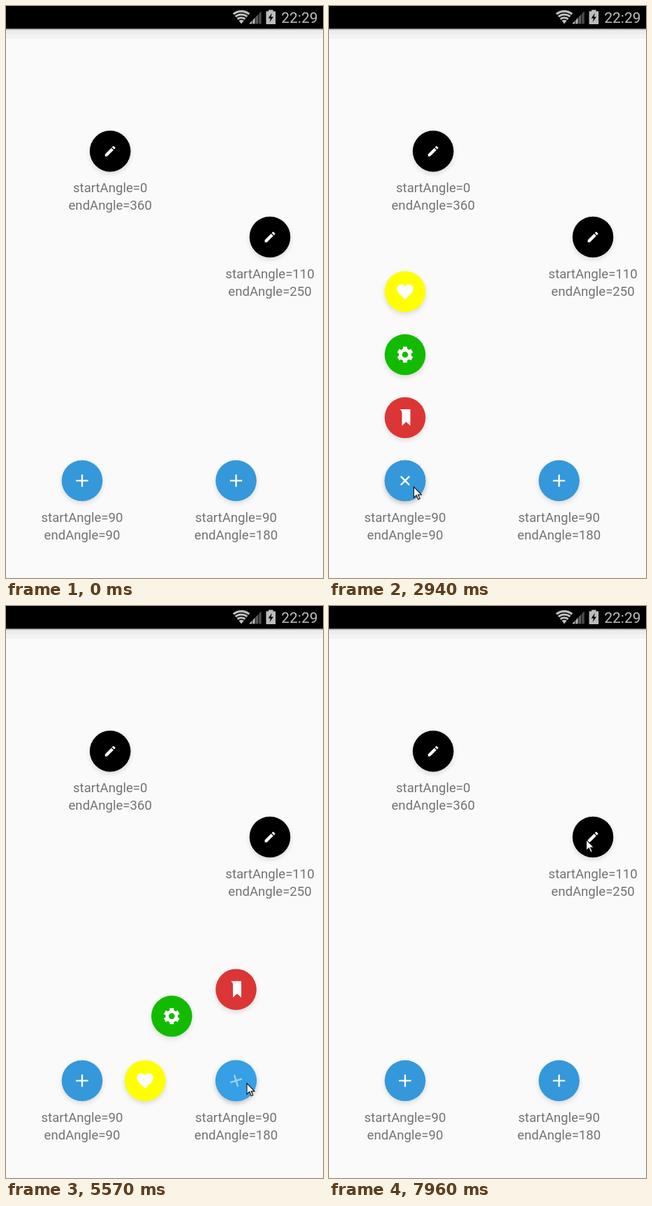
Write an HTML page with a canvas that moves like this. It is 454x817 px and loops after 8000 ms.

```html
<!DOCTYPE html>
<html lang="en">
<head>
<meta charset="utf-8">
<title>Expandable buttons</title>
<style>
html, body { margin: 0; height: 100%; overflow: hidden; background: #fafafa; }
canvas { display: block; }
</style>
</head>
<body>
<canvas id="stage" width="454" height="817"></canvas>
<script>
const g = document.getElementById('stage').getContext('2d');
const LOOP = 8000, R = 29.3, EXPAND = 225, SPIN = 235;
const BLUE = '#3498db', RED = '#dc3535', GREEN = '#12bb00', YELLOW = '#ffff00',
      ORANGE = '#ff8000', PINK = '#f08080', BLACK = '#000';

const pencilPath = new Path2D('M3 17.25V21h3.75L17.81 9.94l-3.75-3.75L3 17.25zM20.71 7.04a1 1 0 0 0 0-1.41l-2.34-2.34a1 1 0 0 0-1.41 0l-1.83 1.83 3.75 3.75z');
const heartPath = new Path2D('M12 21.35l-1.45-1.32C5.4 15.36 2 12.28 2 8.5 2 5.42 4.42 3 7.5 3c1.74 0 3.41.81 4.5 2.09C13.09 3.81 14.76 3 16.5 3 19.58 3 22 5.42 22 8.5c0 3.78-3.4 6.86-8.55 11.54z');
const markPath = new Path2D('M-7.5-12H7.5V11.5L1.5 6-4.5 11.5V-7Q-4.8-10.5-7.5-12z');
const copyPath = new Path2D('M-1.5 6H-8.5V-5L-3.5-10.5H3.5V-6M-8.5-5H-3.5V-10.5M-1.5 0L3.5-6H8.5V10.5H-1.5zM-1.5 0H3.5V-6');
const arrowPath = new Path2D('M.5.8V16.2L4.2 12.8 6.8 18.8 9.2 17.7 6.6 12H11.4z');
const boltPath = new Path2D('M381 10L375.5 17.5H379L377.5 23 383 15.5H379.5z');

function line(width, ...p) {
  g.lineWidth = width;
  g.beginPath();
  for (let i = 0; i < p.length; i += 2) g.lineTo(p[i], p[i + 1]);
  g.stroke();
}
function arc(width, x, y, r, from, to) {
  g.lineWidth = width;
  g.beginPath();
  g.arc(x, y, r, from, to);
  g.stroke();
}
function fitted(path, scale) {
  g.scale(scale, scale);
  g.translate(-12, -12);
  g.fill(path);
}

// Icons are drawn in white around the origin.
const icons = {
  plus() { line(2.3, -8.7, 0, 8.7, 0); line(2.3, 0, -8.7, 0, 8.7); },
  pencil() { fitted(pencilPath, .82); },
  heart() { fitted(heartPath, 1.18); },
  mark() { g.fill(markPath); },
  gear() {
    arc(4.6, 0, 0, 6.6, 0, 7);
    for (let i = 0; i < 6; i++) {
      line(6, 0, -7, 0, -11.4);
      g.rotate(Math.PI / 3);
    }
  },
  search() { arc(3, -3, -3.5, 6, 0, 7); g.lineCap = 'round'; line(4.2, 2.5, 2.5, 8.3, 9); },
  copy() { g.lineWidth = 1.7; g.stroke(copyPath); },
  refresh() {
    for (let i = 0; i < 2; i++) {
      arc(3, 0, 0, 9, Math.PI + .25, Math.PI * 1.85);
      g.beginPath();
      g.moveTo(11.5, -10); g.lineTo(11.5, -2); g.lineTo(3.5, -2);
      g.fill();
      g.rotate(Math.PI);
    }
  }
};

const trio = [['mark', RED], ['gear', GREEN], ['heart', YELLOW]];
const six = [['refresh', ORANGE], ['mark', BLUE], ['gear', PINK], ['heart', YELLOW], ['search', RED], ['copy', GREEN]];

// press/open and press2/close are times in ms; dist is the settled distance of item i.
const menus = [
  { x: 149.2, y: 207.4, from: 0, to: 360, icon: 'pencil', color: BLACK },
  { x: 378, y: 330, from: 110, to: 250, icon: 'pencil', color: BLACK, items: six, dist: () => 181,
    press: 6580, open: 6690, press2: 7520, close: 7605, tip: [380, 346] },
  { x: 109, y: 678, from: 90, to: 90, icon: 'plus', color: BLUE, items: trio, dist: i => 90 * (i + 1),
    press: 2460, open: 2571, press2: 3310, close: 3412, tip: [121, 686] },
  { x: 329.5, y: 678, from: 90, to: 180, icon: 'plus', color: BLUE, items: trio, dist: () => 115.5,
    press: 4540, open: 4651, press2: 5360, close: 5462, tip: [344.5, 681] }
];

// Pointer path: time, x, y of the tip.
const track = [
  [1490, 14, 757], [1700, 52, 730], [1900, 95, 701], [2050, 116, 688], [2150, 121, 686],
  [3570, 121, 686], [3640, 126, 686], [3760, 168, 686], [3920, 262, 684], [4060, 318, 682],
  [4120, 326, 681], [4300, 344.5, 681],
  [5720, 344.5, 681], [5840, 374, 632], [5930, 389, 555], [6030, 384, 450], [6130, 380, 363],
  [6200, 380, 354], [6250, 380, 346], [7890, 380, 346], [7960, 368, 333]
];

const clamp = v => Math.max(0, Math.min(1, v));
const overshoot = s => 1 + (s - 1) ** 2 * (3 * (s - 1) + 2);
const anticipate = s => s * s * (3 * s - 2);
const within = (t, a, b) => t >= a && t < b;

function disc(x, y, r = R) {
  g.beginPath();
  g.arc(x, y, r, 0, 7);
}

function button(x, y, color, icon, turn = 0) {
  g.save();
  g.shadowColor = 'rgba(0,0,0,.13)';
  g.shadowBlur = 7;
  g.shadowOffsetY = 3;
  g.fillStyle = color;
  disc(x, y);
  g.fill();
  g.restore();
  g.save();
  g.translate(x, y);
  g.rotate(turn);
  g.fillStyle = g.strokeStyle = '#fff';
  icons[icon]();
  g.restore();
}

function ripple(m, age) {
  g.save();
  disc(m.x, m.y);
  g.clip();
  g.globalAlpha = .5;
  g.fillStyle = m.color === BLUE ? '#3aa8f0' : BLACK;
  disc(m.tip[0], m.tip[1], 68 * clamp(age / 160));
  g.fill();
  g.restore();
}

function mainButton(m, t) {
  const pressed = within(t, m.press, m.open) || within(t, m.press2, m.close);
  const turn = m.icon === 'plus' && m.items
    ? Math.PI * .75 * (clamp((t - m.open) / SPIN) - clamp((t - m.close) / SPIN)) : 0;
  button(m.x, m.y, pressed && m.color === BLUE ? '#2e88c5' : m.color, m.icon, turn);
  if (within(t, m.open, m.open + 330)) ripple(m, t - m.open);
  if (within(t, m.close, m.close + 220)) ripple(m, t - m.close);
}

function items(m, t) {
  const k = t < m.close
    ? overshoot(clamp((t - m.open) / EXPAND))
    : 1 - anticipate((t - m.close) / EXPAND);
  m.items.forEach(([icon, color], i) => {
    const a = (m.from + (m.to - m.from) * i / (m.items.length - 1)) * Math.PI / 180;
    const d = m.dist(i) * k;
    button(m.x + d * Math.cos(a), m.y - d * Math.sin(a), color, icon);
  });
}

function label(m) {
  g.font = '18.6px Roboto, sans-serif';
  g.textAlign = 'center';
  g.fillStyle = '#737373';
  g.fillText('startAngle=' + m.from, m.x, m.y + 59);
  g.fillText('endAngle=' + m.to, m.x, m.y + 84);
}

function rect(color, x, y, w, h) {
  g.fillStyle = color;
  g.fillRect(x, y, w, h);
}

function statusBar() {
  rect('#f3f3f3', 0, 32, 454, 15);
  rect('#ececec', 0, 32, 454, 8);
  rect('#dcdcdc', 0, 32, 454, 3);
  rect('#a8a4a4', 0, 32, 454, 1.5);
  rect('#000', 0, 0, 454, 32.4);

  // Wi-Fi fan
  const up = -Math.PI / 2;
  g.fillStyle = '#bdbdbd';
  g.beginPath();
  g.moveTo(337, 25.5);
  g.arc(337, 25.5, 19.5, up - .68, up + .68);
  g.fill();
  g.strokeStyle = '#000';
  for (const r of [6.5, 11, 15.5]) arc(1.3, 337, 25.5, r, up - .8, up + .8);

  // Signal strength
  ['#bdbdbd', '#a8a8a8', '#5c5c5c', '#4a4a4a'].forEach((c, i) => {
    const x = 348.5 + i * 4.5, top = 21.5 - i * 4.6;
    g.fillStyle = c;
    g.beginPath();
    g.moveTo(x, 25.5);
    g.lineTo(x, top + 3.5);
    g.lineTo(x + 3.7, top - .4);
    g.lineTo(x + 3.7, 25.5);
    g.fill();
  });

  // Battery
  rect('#bdbdbd', 372.5, 7.5, 13.5, 18.5);
  rect('#bdbdbd', 376, 5.5, 6.5, 3);
  g.fillStyle = '#000';
  g.fill(boltPath);

  g.font = '21px Roboto, sans-serif';
  g.textAlign = 'right';
  g.fillStyle = '#bdbdbd';
  g.fillText('22:29', 446.5, 24.3);
}

function pointer(t) {
  if (t < track[0][0]) return;
  let i = track.findIndex(p => p[0] > t);
  if (i < 0) i = track.length - 1;
  const [t0, x0, y0] = track[i - 1], [t1, x1, y1] = track[i];
  const s = clamp((t - t0) / (t1 - t0));
  g.save();
  g.translate(x0 + (x1 - x0) * s, y0 + (y1 - y0) * s);
  g.fillStyle = '#fff';
  g.strokeStyle = '#111';
  g.lineWidth = 1.1;
  g.fill(arrowPath);
  g.stroke(arrowPath);
  g.restore();
}

function draw(now) {
  const t = now % LOOP;
  rect('#fafafa', 0, 0, 454, 817);
  statusBar();
  for (const m of menus) {
    label(m);
    mainButton(m, t);
  }
  const active = menus.find(m => m.items && within(t, m.open, m.close + EXPAND));
  if (active) {
    items(active, t);
    mainButton(active, t);
  }
  pointer(t);
  requestAnimationFrame(draw);
}
requestAnimationFrame(draw);
</script>
</body>
</html>
```
